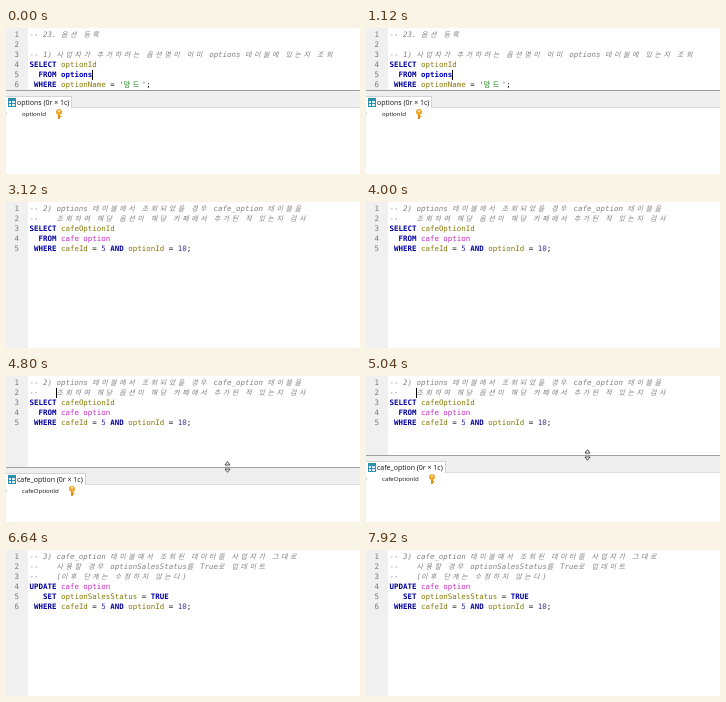
Recreate the animation shown at these times as an HTML page. Size 354 by 146 pixels, loop 8000 ms.

```html
<!DOCTYPE html>
<html lang="ko">
<head>
<meta charset="utf-8">
<style>
html, body { margin: 0; width: 100%; height: 100%; overflow: hidden; background: #fff; }
#stage { position: relative; width: 354px; height: 146px; overflow: hidden; background: #fff; }
#stage div, #stage svg, #stage i { position: absolute; }
#gutter { left: 0; top: 0; width: 22px; height: 146px; background: #f0f0f0; }
pre { position: absolute; margin: 0; top: 2px; font: 7.46px/10px "DejaVu Sans Mono", monospace; color: #111; }
pre span { line-height: 0; }
#nums { left: 8.5px; color: #777; }
#code { left: 23.5px; }
.k { color: #0000a0; font-weight: bold; }
.t { color: #0000c8; font-weight: bold; }
.m { color: #c32cc3; }
.o { color: #857a08; }
.n { color: #30309a; }
.s { color: #088008; }
.c { color: #808080; font-style: italic; }
.h { font: 7px/0 "Noto Sans CJK KR", "Noto Sans CJK", sans-serif; font-style: inherit; letter-spacing: 2.54px; }
#caret { width: 1px; height: 10px; background: #000; }
#pane { left: 0; width: 354px; height: 146px; background: #fff; font: 7px/10px "Open Sans", sans-serif; color: #111; white-space: pre; }
#bar { top: 0; width: 354px; height: 18px; box-sizing: border-box; background: #efefef; border-top: 1px solid #a0a0a0; border-bottom: 1px solid #dcdcdc; }
#tab { top: 6px; left: 0; height: 12px; padding: 1px 2px 0 11px; box-sizing: border-box; background: #fff; border: solid #d4d4d4; border-width: 1px 1px 0 0; }
#head { top: 19px; left: 16px; font-size: 6.1px; }
#hash { top: 19px; left: -3px; font-size: 6.1px; color: #555; }
</style>
</head>
<body>
<div id="stage">
  <div id="gutter"></div>
  <pre id="nums"></pre>
  <pre id="code"></pre>
  <i id="caret"></i>
  <div id="pane">
    <div id="bar"></div>
    <div id="tab"></div>
    <svg style="left:2px;top:8px" width="8" height="9">
      <path d="M0 0h8v9h-8z" fill="#2f8fae"/>
      <path d="M1 3h2v2h-2zM4 3h3v2h-3zM1 6h2v2h-2zM4 6h3v2h-3z" fill="#d8f0f6"/>
    </svg>
    <div id="hash">#</div>
    <div id="head"></div>
    <svg id="key" style="top:19px" width="8" height="10">
      <path d="M3 5h2v5h-2zM5 7h1.5v1h-1.5z" fill="#dc9018"/>
      <circle cx="4" cy="3" r="3" fill="#f2a72a"/>
      <circle cx="4" cy="2" r="1" fill="#fff3d8"/>
    </svg>
  </div>
  <svg id="pointer" style="left:217px" width="9" height="12">
    <path d="M4.5 .7L7 4H2zM4.5 11.3L7 8H2z" fill="#fff" stroke="#222" stroke-width=".8"/>
    <path d="M2 6h5" stroke="#999" stroke-width=".6"/>
  </svg>
</div>
<script>
const $ = id => document.getElementById(id);
const LOOP = 8000, SECOND = 1440, THIRD = 6640;
const OPEN = 4560, DRAG = 4800, DROP = 5240;

const screens = [
`-- 23. 옵션 등록

-- 1) 사업자가 추가하려는 옵션명이 이미 options 테이블에 있는지 조회
SELECT optionId
  FROM options
 WHERE optionName = '망드';`,
`-- 2) options 테이블에서 조회되었을 경우 cafe_option 테이블을
--    조회하여 해당 옵션이 해당 카페에서 추가된 적 있는지 검사
SELECT cafeOptionId
  FROM cafe option
 WHERE cafeId = 5 AND optionId = 10;`,
`-- 3) cafe_option 테이블에서 조회된 데이터를 사업자가 그대로
--    사용할 경우 optionSalesStatus를 True로 업데이트
--    (이후 단계는 수정하지 않는다)
UPDATE cafe option
   SET optionSalesStatus = TRUE
 WHERE cafeId = 5 AND optionId = 10;`];

const rules = [
  ["c", /^--/], ["s", /^'/], ["n", /^\d/], ["k", /^[A-Z]+$/],
  ["t", /^options$/], ["m", /^cafe option$/], ["o", /^\w/]];
const wrap = (cls, text) => `<span class="${cls}">${text}</span>`;

function highlight(sql) {
  return sql
    .replace(/--.*|'[^']*'|cafe option|\w+/g, word => wrap(rules.find(r => r[1].test(word))[0], word))
    .replace(/[가-힣]+/g, run => wrap("h", run));
}

let shown = -1;
function show(n) {
  if (n === shown) return;
  shown = n;
  $("code").innerHTML = highlight(screens[n]);
  $("nums").textContent = screens[n].split("\n").map((_, i) => i + 1).join("\n");
  $("tab").textContent = (n ? "cafe_option" : "options") + " (0r × 1c)";
  $("head").textContent = n ? "cafeOptionId" : "optionId";
  $("key").style.left = (n ? 62 : 49) + "px";
}

const visible = (id, on) => $(id).style.visibility = on ? "visible" : "hidden";

function draw(now) {
  const t = now % LOOP;
  const n = t < SECOND ? 0 : t < THIRD ? 1 : 2;
  show(n);

  const p = Math.min(1, Math.max(0, (t - DRAG) / (DROP - DRAG)));
  const split = n ? 91 - 21 * p * p * (3 - 2 * p) : 62;
  const open = n === 0 || (n === 1 && t >= OPEN);
  $("pane").style.top = split + "px";
  $("pane").style.display = open ? "" : "none";

  $("pointer").style.top = split - 6 + "px";
  visible("pointer", t >= OPEN && t < 5400);

  $("caret").style.left = (n ? 50 : 86) + "px";
  $("caret").style.top = (n ? 12 : 42) + "px";
  visible("caret", n === 0 || (t >= 4400 && t < 5400));
}

let start;
function tick(now) {
  start ??= now;
  draw(now - start);
  requestAnimationFrame(tick);
}
draw(0);
requestAnimationFrame(tick);
</script>
</body>
</html>
```
